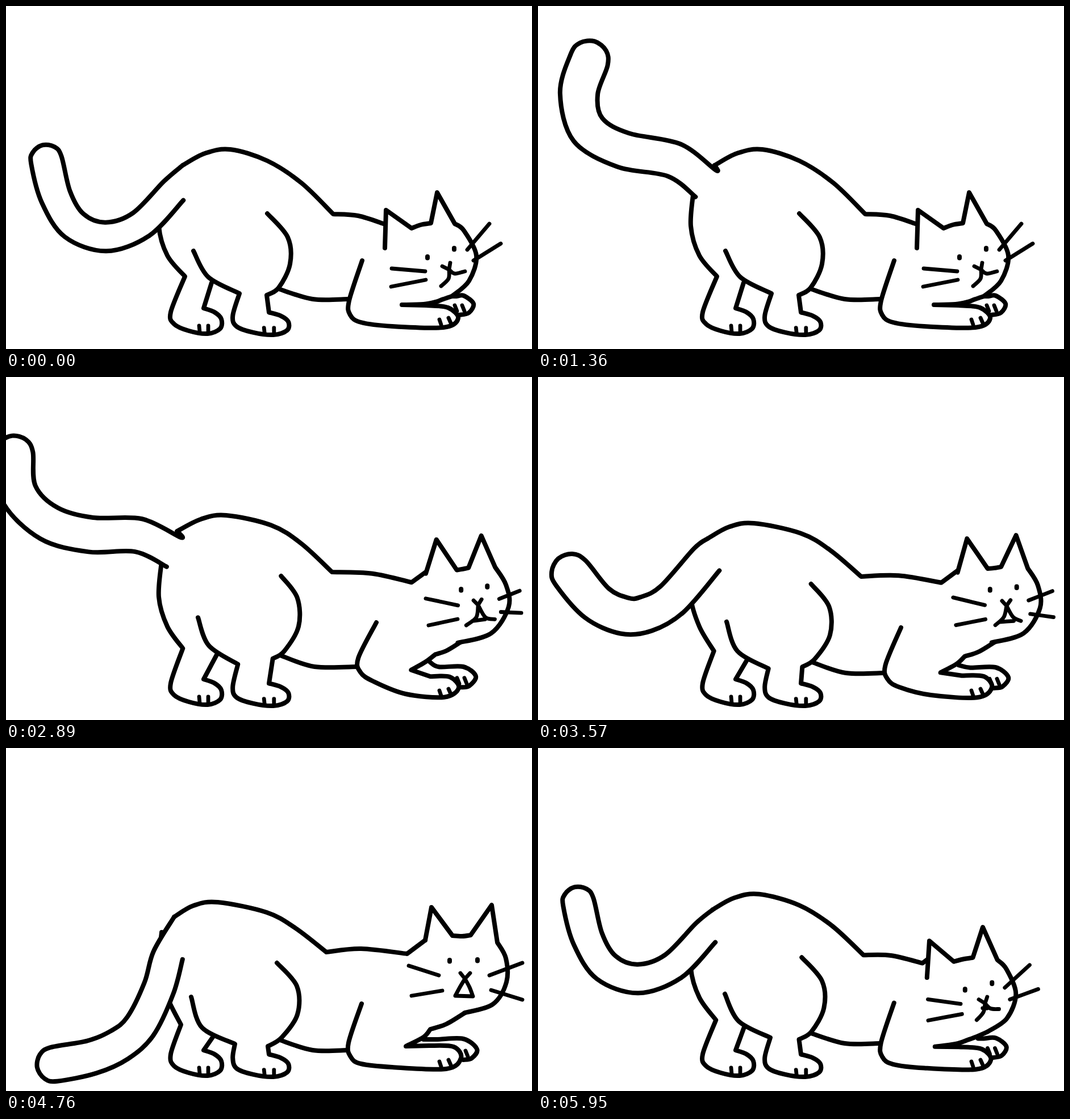
An HTML page for the animation above (6120 ms loop, 926 px wide and 605 px high).

```html
<!DOCTYPE html>
<html lang="en">
<head>
<meta charset="utf-8">
<title>Cat ready to pounce</title>
<style>
html, body { margin: 0; width: 100%; height: 100%; overflow: hidden; background: #fff; }
svg { display: block; width: 100vw; height: 100vh; }
path { fill: none; stroke: #000; stroke-width: 8; stroke-linecap: round; stroke-linejoin: round; }
.solid { fill: #fff; }
.fine { stroke-width: 6.8; }
</style>
</head>
<body>
<svg id="stage" viewBox="0 0 926 605"></svg>
<script>
const STEP = 170, STEPS = 36;

// Stroke notation: points joined by a smooth curve, "/" is a corner, ";" lifts the pen.
const crouch = {
  back: '311,281 350,260 395,253 460,273 520,312 576,367/620,370 667,385/667,385',
  hock: '315,477', shin: '362,488',
  thigh: '330,432 356,478 411,507', knee: '459,510/480,497 500,455 496,408 460,366',
  belly: '480,499 540,517 602,517',
  paw: '788,512/793,512 806,511 823,525 815,541 798,545',
  arm: '627,449 604,520 606,545 625,558 680,565 770,567 796,551 778,532 740,528/697,527/735,526 760,521/770,517 785,512',
  head: '667,427/669,360/714,392/730,386 748,383/759,329/790,384/806,396 828,440 815,485 785,512',
  whiskers: '679,463 738,468;678,495 739,483;812,430 851,384;823,449 871,419',
  eyes: '742,442;789,427',
  mouth: '768,459/780,465/782,453;780,465 779,481 766,494;780,465 790,472 808,468;780,466 781,466'
};

const rise = {
  back: '304,259 350,237 395,230 470,247 524,281 579,336/655,343 718,362/739,347',
  hock: '313,474', shin: '376,477',
  thigh: '344,417 363,464 411,499', knee: '474,482/492,470 516,425 513,374 488,337',
  belly: '486,480 545,500 628,500',
  paw: '752,497/763,510 805,510 826,526 813,544 798,546',
  arm: '665,424 629,483 632,508 658,527 715,557 770,564 795,549 778,530 748,530/718,512/740,499 760,486/775,481 795,469',
  head: '739,347/758,287/794,341/804,339 814,337/836,280/861,335/880,366 885,405 854,452 795,469',
  whiskers: '740,391 797,403;745,438 796,427;869,391 904,377;872,414 907,415',
  eyes: '802,374;848,368',
  mouth: '824,394/832,402/838,392;832,402 829,424 811,438;832,402 845,424 862,427;822,430 844,427'
};

const low = {
  back: '296,298 330,278 373,272 459,290 510,318 564,360/625,354 706,363/738,339',
  hock: '308,488', shin: '364,510',
  thigh: '326,439 345,493 403,522', knee: '461,526/485,511 513,470 512,420 477,379',
  belly: '482,515 540,533 601,533',
  paw: '735,514/760,514 805,513 829,531 820,547 805,550',
  arm: '626,451 603,520 607,545 625,557 680,563 775,566 801,547 788,527 745,525/704,526/735,510 747,496/775,487 808,467',
  head: '738,339/749,281/786,331/803,332 818,330/855,277/865,343/880,371 881,413 857,452 808,467',
  whiskers: '709,384 762,401;714,437 768,428;851,401 909,379;854,427 909,444',
  eyes: '781,374;830,373',
  mouth: '800,397/808,407/817,397;808,407 799,422 791,437;808,407 816,422 822,438;791,437 822,438'
};

const HEAD = ['head', 'whiskers', 'eyes', 'mouth'];
const lag = t => t ** 3;
const linear = t => t;

// Step, pose and the easing of the head on the way to it.
const bodyKeys = [[0, crouch], [8, crouch], [13, rise], [25, low, lag], [32, low], [36, crouch]];

// A tail is a spine from rump to tip and a thickness.
const tail = (r, text) => ({ r, spine: points(text) });
const curled = tail(27.5, '295,326 238,385 176,407 120,387 88,337 71,272');
const tailKeys = [
  [0, curled],
  [8, tail(34, '295,313 240,272 150,254 88,218 72,155 90,95')],
  [13, tail(29, '284,300 238,312 206,358 178,397 130,427 64,434')],
  [18, tail(34, '298,311 238,268 150,245 80,200 45,130 64,61')],
  [21, tail(34, '297,322 236,392 190,418 152,421 104,399 58,346')],
  [25, tail(30, '281,364 264,418 231,484 195,516 150,536 82,551')],
  [32, tail(31, '291,368 276,432 244,500 206,534 153,557 89,567')],
  [35, curled],
  [36, curled]
];

function points(text) {
  return text.split(' ').map(p => p.split(',').map(Number));
}

const lerp = (a, b, t) => a + (b - a) * t;
const polar = ([x, y], r, angle) => [x + r * Math.cos(angle), y + r * Math.sin(angle)];

function mix(a, b, t) {
  const to = b.match(/[\d.]+/g);
  let i = 0;
  return a.replace(/[\d.]+/g, v => lerp(+v, +to[i++], t).toFixed(1));
}

function curve(pts) {
  let d = '';
  for (let i = 0; i < pts.length - 1; i++) {
    const p = pts[i], q = pts[i + 1];
    const before = pts[i - 1] || p, after = pts[i + 2] || q;
    const c1 = p.map((v, k) => v + (q[k] - before[k]) / 6);
    const c2 = q.map((v, k) => v - (after[k] - p[k]) / 6);
    d += `C${c1} ${c2} ${q}`;
  }
  return d;
}

function outline(text) {
  return text.split(';').map(stroke => {
    let d = '', last;
    for (const piece of stroke.split('/')) {
      const pts = points(piece);
      if (last) pts.unshift(last);
      else d = `M${pts[0]}`;
      d += curve(pts);
      last = pts.at(-1);
    }
    return d;
  }).join('');
}

// Hind foot planted on the ground, with its two toe lines.
function foot(x, y, w, h) {
  const place = text => points(text).map(p => [x + p[0] * w, y + p[1] * h]).join(' ');
  return {
    sole: place('2,-38 8,-17 34,-5 67,0 89,-9 91,-26 79,-38 60,-45'),
    toes: place('52,-14 53,-3') + ';' + place('68,-14 68,-2')
  };
}
const farFoot = foot(288, 578, 1, 1);
const nearFoot = foot(397, 580, 1.1, 0.88);

function pawToes(paw) {
  const [x, y] = points(paw.split('/')[1])[2];
  return [20, 33].map(dx => `${x - dx},${y + 3} ${x - dx + 4},${y + 13}`).join(';');
}

// Swing every link of the spine around the one before it.
function bend(a, b, t) {
  const spine = [a[0].map((v, k) => lerp(v, b[0][k], t))];
  for (let i = 1; i < a.length; i++) {
    const [from, to] = [a, b].map(s => [s[i][0] - s[i - 1][0], s[i][1] - s[i - 1][1]]);
    const angle = Math.atan2(from[1], from[0]);
    const turn = Math.atan2(to[1], to[0]) - angle;
    const short = Math.atan2(Math.sin(turn), Math.cos(turn));
    const length = lerp(Math.hypot(...from), Math.hypot(...to), t);
    spine.push(polar(spine[i - 1], length, angle + short * t));
  }
  return spine;
}

function tailOutline(spine, r, joint) {
  const end = spine.length - 1;
  const heading = spine.map((p, i) => {
    const a = spine[i - 1] || p, b = spine[i + 1] || p;
    return Math.atan2(b[1] - a[1], b[0] - a[0]);
  });
  const edge = side => spine.map((p, i) =>
    polar(p, r * lerp(0.87, 1, i / end), heading[i] + side * Math.PI / 2));
  const cap = [1, 0, -1].map(k => polar(spine[end], r, heading[end] + k * Math.PI / 4));
  const pts = [joint, ...edge(1), ...cap, ...edge(-1).reverse()];
  return `M${joint}` + curve(pts);
}

const stage = document.getElementById('stage');
const shapes = {};
function layer(name, style) {
  const path = document.createElementNS('http://www.w3.org/2000/svg', 'path');
  path.setAttribute('class', style);
  shapes[name] = stage.appendChild(path);
}
for (const name of ['farLeg', 'tail', 'back', 'nearLeg', 'belly', 'paw', 'pawToes', 'arm', 'head',
  'toes', 'whiskers', 'eyes', 'mouth']) {
  const style = name === 'tail' || name === 'arm' ? 'solid'
    : /toes|whiskers|mouth/i.test(name) ? 'fine' : '';
  layer(name, style);
}
const draw = (name, d) => shapes[name].setAttribute('d', d);

function span(keys, step) {
  const i = keys.findIndex(([at]) => at > step);
  const [from, a] = keys[i - 1], [to, b, ease = linear] = keys[i];
  return { a, b, ease, t: (step - from) / (to - from) };
}

function render(step) {
  const { a, b, ease, t } = span(bodyKeys, step);
  const pose = {};
  for (const part in a) pose[part] = mix(a[part], b[part], HEAD.includes(part) ? ease(t) : t);

  for (const part of ['back', 'belly', 'paw', 'arm', 'head', 'whiskers', 'mouth']) {
    draw(part, outline(pose[part]));
  }
  draw('farLeg', outline(`274,325 269,388 284,440 ${pose.hock}/${farFoot.sole}/${pose.shin}`));
  draw('nearLeg', outline(`${pose.thigh}/${nearFoot.sole}/${pose.knee}`));
  draw('pawToes', outline(pawToes(pose.paw)));
  draw('toes', outline(`${farFoot.toes};${nearFoot.toes};763,553 766,562;779,550 783,559`));
  draw('eyes', pose.eyes.split(';').map(p => `M${p}v2.5`).join(''));

  const swing = span(tailKeys, step);
  const spine = bend(swing.a.spine, swing.b.spine, swing.t);
  const joint = points(pose.back.split(' ')[0])[0];
  draw('tail', tailOutline(spine, lerp(swing.a.r, swing.b.r, swing.t), joint));
}

const start = performance.now();
let shown = -1;

function tick() {
  const step = Math.floor((performance.now() - start) / STEP) % STEPS;
  if (step !== shown) render(shown = step);
  requestAnimationFrame(tick);
}
tick();
</script>
</body>
</html>
```
